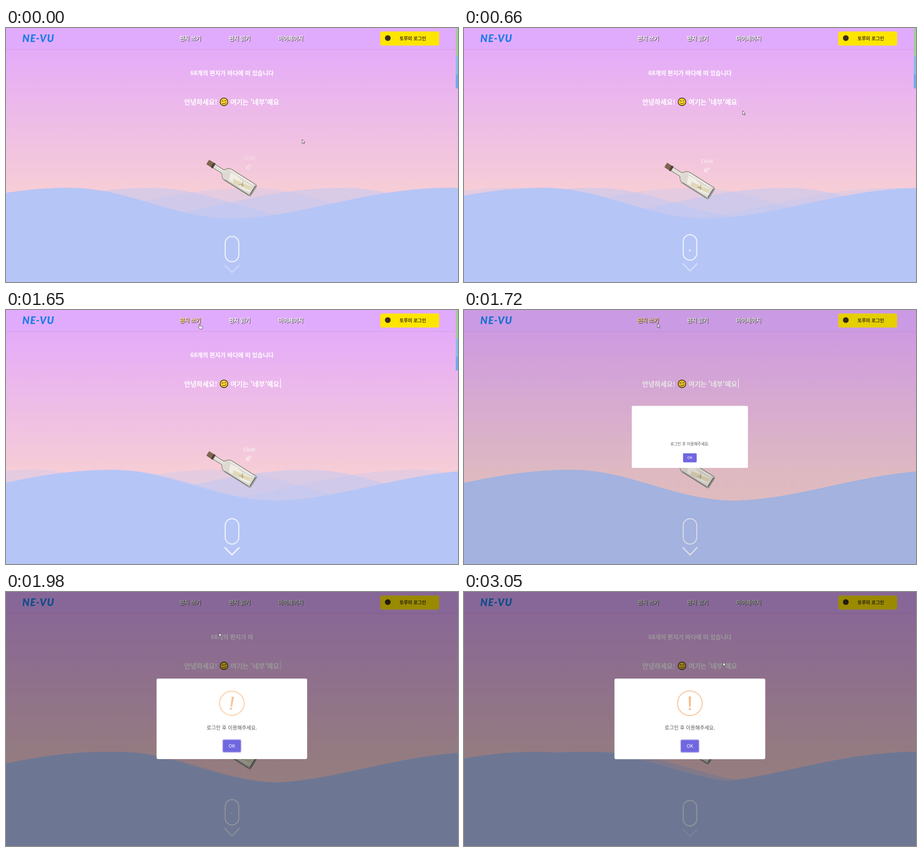
These frames come from a looping animation (998 px wide and 561 px high, 3120 ms). An HTML page:

```html
<!DOCTYPE html>
<html lang="ko">
<head>
<meta charset="utf-8">
<title>바다 편지</title>
<style>
  html, body { margin: 0; width: 100%; height: 100%; overflow: hidden; background: #e2a6fe; }
  svg { display: block; width: 998px; height: 561px; }
  text { font-family: "Noto Sans CJK KR", "Noto Sans CJK", "Noto Sans", sans-serif; font-weight: 500; fill: #fff; }
  .mid { text-anchor: middle; }
  .bold, .nav text { font-weight: 700; }
  .nav text { font-size: 12px; text-shadow: 1px 1px 1px #333; }
  .logo { font: italic 900 22px Lato, sans-serif; letter-spacing: 1.5px; fill: #1f7ee8; }
  .line { fill: none; stroke: #fff; stroke-linecap: round; stroke-linejoin: round; }
  .wave { fill: #b5c5f6; }
</style>
</head>
<body>
<svg viewBox="0 0 998 561">
  <defs>
    <linearGradient id="sky" x1="0" y1="0" x2="0" y2="1">
      <stop offset="0" stop-color="#e2a6fe"/>
      <stop offset=".64" stop-color="#f6cdd6"/>
      <stop offset="1" stop-color="#f9d4d0"/>
    </linearGradient>
    <linearGradient id="edge" x1="0" y1="0" x2="0" y2="1">
      <stop offset="0" stop-color="#000" stop-opacity=".04"/>
      <stop offset="1" stop-color="#000" stop-opacity="0"/>
    </linearGradient>
  </defs>

  <rect width="998" height="561" fill="url(#sky)"/>
  <g id="waves">
    <path class="wave"/><path class="wave"/><path class="wave"/><path class="wave"/><path class="wave"/>
  </g>

  <rect width="998" height="46" fill="#e1abfd"/>
  <rect y="46" width="998" height="5" fill="url(#edge)"/>
  <text class="logo" x="36" y="31">NE-VU</text>
  <g class="nav mid">
    <text id="write" x="406.500" y="27.500">편지 쓰기</text>
    <text x="515.500" y="27.500">편지 읽기</text>
    <text x="628.500" y="27.500">마이페이지</text>
  </g>
  <rect x="826.300" y="7.700" width="130" height="31" rx="4" fill="#fee500"/>
  <circle cx="843" cy="22.300" r="6.300" fill="#3a2d17"/>
  <text class="bold" x="869" y="27" font-size="10.100" style="fill:#4a3c17">토루미 로그인</text>
  <g id="strip">
    <rect x="993" width="5" height="63" fill="#a6c99f"/>
    <rect x="993" y="63" width="5" height="40" fill="#8bbde8"/>
    <rect x="993" y="103" width="5" height="30.500" fill="#6eaeea"/>
  </g>

  <text id="count" class="mid bold" x="499" y="103.500" font-size="12.900"></text>
  <rect id="countCaret" x="589" y="90" width="1.200" height="17" fill="#fff"/>
  <text class="bold" x="393.500" y="168.500" font-size="14.700">안녕하세요!</text>
  <text class="bold" x="495.500" y="168.500" font-size="14.600">여기는 '네부'예요</text>
  <rect id="caret" x="605.300" y="152" width="1.500" height="21" fill="#fff"/>
  <g transform="translate(481.300 163)" fill="none" stroke="#2b2412" stroke-linecap="round">
    <circle r="8.500" fill="#f9cd2c" stroke-width="1.400"/>
    <path d="M-5-1.500q1.800-2 3.600 0M1.400-2.200q1.800-2 3.600 0M-3.500 3.800Q2 6 5 1.500"/>
  </g>

  <g id="bottle">
    <g transform="translate(447 297) rotate(32.200)">
      <path d="M14-4.500H38Q43-14 51-14.500H114Q118-14.500 118-11V11Q118 14.500 114 14.500H51Q43 14 38 4.500H14Z"
            fill="#dcdcd3" fill-opacity=".85" stroke="#777a6c" stroke-width="1.200"/>
      <path d="M16-2H42M18 2.200H40" stroke="#f4f4ee" stroke-width="1.300" opacity=".8"/>
      <path d="M49-11.500H110" stroke="#f5f5f0" stroke-width="1.800"/>
      <path d="M50 13H114" stroke="#85897b" stroke-width="1.500"/>
      <path d="M53-7L70-9 82-5 108-7 112 7 91 10 78 7 60 10Z" fill="#f0eee5"/>
      <path d="M66 1L108-5 110 3 69 9Z" fill="#e2d8b6"/>
      <path d="M87-5L91 6M83 6q5-7 10-3" fill="none" stroke="#8b8165" stroke-width=".9"/>
      <path d="M115.500-12V12" stroke="#65685d" stroke-width="2.200"/>
      <rect x="-2" y="-6" width="13" height="12" rx="2" fill="#806550"/>
      <rect x="10" y="-6.500" width="5" height="13" rx="2" fill="#4d4137"/>
    </g>
    <g id="hint">
      <text class="mid" x="537.500" y="291" font-size="10.600">Click!</text>
      <path class="line" d="M538 301L532 308M542 303L535 310M531 304.500V311.500H538" stroke-width="1.200"/>
    </g>
  </g>

  <g id="mouse">
    <rect class="line" x="484" y="461" width="30" height="56" rx="15" stroke-width="2.500" opacity=".76"/>
    <circle id="dot" cx="498.700" r="2" fill="#fff"/>
    <path id="chevron" class="line" d="M483.500 525L499 541 514.500 525" stroke-width="2.800" stroke-linecap="butt"/>
  </g>

  <rect id="shade" width="998" height="561"/>
  <g id="modal">
    <rect x="-166.500" y="-89" width="333" height="178" rx="3.500" fill="#fff"/>
    <g id="icon">
      <circle r="27.300" fill="none" stroke="#facea8" stroke-width="2.500"/>
      <g id="mark" fill="#f8bb86">
        <path d="M-2.600-15H2.600L1.700 8H-1.700Z"/>
        <circle cy="12.700" r="2.500"/>
      </g>
    </g>
    <text class="mid" y="24" font-size="11.100" style="fill:#545454">로그인 후 이용해주세요.</text>
    <rect id="ring" x="-21" y="45" width="42" height="30" rx="4" fill="#b7b2ef"/>
    <rect x="-19.500" y="47" width="39" height="26" rx="2.500" fill="#7066e0"/>
    <text class="mid" y="63.800" font-size="10.500">OK</text>
  </g>

  <g id="pointer" fill="#fff" stroke="#333" stroke-width=".8" stroke-linejoin="round">
    <path id="arrow" d="M0 0V9L2 7.200 3.500 10.300 4.900 9.600 3.500 6.700H6Z"/>
    <path id="hand" d="M-.5 1q1-1.600 2 0V5l4.500 1q1.600.500 1.300 2L6.300 12H1L-2.500 7.500q0-1.600 2-.2Z"/>
  </g>
</svg>
<script>
const LOOP = 3120, TICK = 66, TICK_MS = 66.2, LAST = 46, OPEN = 1700;
const COUNT_TEXT = "68개의 편지가 바다에 떠 있습니다";
const $ = id => document.getElementById(id);
const waves = [...$("waves").children];
const set = (el, attr, value) => el.setAttribute(attr, value);
const fade = (id, value) => set($(id), "opacity", value);
const clamp = v => Math.max(0, Math.min(1, v));

// Linear track through [time, value] pairs.
function track(t, keys) {
  let i = 1;
  while (i < keys.length - 1 && t > keys[i][0]) i++;
  const [t0, a] = keys[i - 1], [t1, b] = keys[i];
  return a + (b - a) * clamp((t - t0) / (t1 - t0));
}

// The CSS "ease" curve, cubic-bezier(.25, .1, .25, 1).
function ease(x) {
  if (x <= 0) return 0;
  if (x >= 1) return 1;
  let lo = 0, hi = 1, u;
  for (let i = 0; i < 20; i++) {
    u = (lo + hi) / 2;
    const v = 1 - u;
    if (.75 * v * u + u * u * u < x) lo = u; else hi = u;
  }
  const v = 1 - u;
  return .3 * v * v * u + 3 * v * u * u + u * u * u;
}

// Waves fall faster than they rise.
const FALL = 362, RISE = 480, PERIOD = FALL + RISE;
function waveY(x, crest) {
  const d = ((x - crest) % PERIOD + PERIOD) % PERIOD;
  const phase = d < FALL ? d / FALL : 1 + ((d - FALL) / RISE) ** .9;
  return 387 - 34 * Math.cos(Math.PI * phase);
}
function drawWave(el, crest, opacity) {
  let d = "M0 561";
  for (let x = 0; x <= 1000; x += 5) d += `L${x} ${waveY(x, crest).toFixed(2)}`;
  set(el, "d", d + "V561Z");
  set(el, "opacity", opacity);
}

// Four sheer waves drift left behind a solid one drifting right;
// opening the dialog restarts them all from one place.
function drawWaves(t) {
  const s = t / 1000, d = (t - OPEN) / 1000, left = 47 * s;
  const list = d < 0
    ? [[540 - left, .28], [139 - left, .28], [320 - left, .45], [745 - left, .45], [139 + 56 * s, 1]]
    : [[235 - 30 * d, .3], [235, .3], [235 + 56 * d, .5], [235 - 56 * d, 1], [235 + 27 * d, 1]];
  list.forEach(([crest, opacity], i) => drawWave(waves[i], crest, opacity));
}

const pulse = (t, from, to) => t > from && t < to ? Math.sin(Math.PI * (t - from) / (to - from)) ** 2 : 0;

function drawText(t) {
  const shown = t < OPEN ? 1 : clamp((t - 1810) / 350);
  $("count").textContent = COUNT_TEXT.slice(0, Math.round(shown * COUNT_TEXT.length));
  fade("countCaret", pulse(t, 70, 750));
  const steady = track(t, [[760, 0], [1150, 1], [1850, 1], [2300, 0]]);
  fade("caret", Math.max(steady, pulse(t, 70, 750), pulse(t, 2430, 3030)));
  $("write").style.fill = t > 1250 && t < 1950 ? "#ffdf80" : "#fff";
}

function drawFloaters(t) {
  const y = track(t, [[0, 0], [660, 6.5], [1190, 12], [1720, 22], [1790, 22], [2380, 15], [3050, 9]]);
  set($("bottle"), "transform", `translate(0 ${y})`);
  fade("hint", track(t, [[0, .5], [660, .85], [1190, 1]]));

  const p = ((t + 1270) % 1500) / 1500;
  set($("mouse"), "transform", `translate(0 ${-5 * Math.sin(Math.PI * p ** .8) ** 2})`);
  set($("dot"), "cy", 484 + 40 * p);
  fade("dot", track(p, [[0, 0], [.25, .8], [.65, .8], [.82, 0]]));
  fade("chevron", track(t, [[0, .3], [660, .4], [1190, .88], [1790, .85], [2380, .28], [3050, .3]]));
}

function drawModal(t) {
  const d = t - OPEN, open = d >= 0;
  fade("strip", open ? 0 : 1);
  fade("shade", .4 * clamp(d / 88));
  fade("modal", open ? 1 : 0);
  if (!open) return;
  const scale = d < 135 ? .7 + .35 * ease(d / 135)
    : d < 240 ? 1.05 - .1 * ease((d - 135) / 105)
    : .95 + .05 * ease((d - 240) / 60);
  set($("modal"), "transform", `translate(498.7 280.2) scale(${scale})`);
  fade("ring", d > 60 ? 1 : 0);
  const turn = ease(d / 500);
  const tilt = Math.abs(Math.cos((1 - turn) * 100 * Math.PI / 180));
  set($("icon"), "transform", `translate(0 -34.5) scale(1 ${tilt})`);
  fade("icon", turn);
  const spin = track(d, [[0, 45], [125, -25], [250, 15], [375, -5], [500, 0]]);
  set($("mark"), "transform", `rotate(${spin})`);
}

const PATH = [
  [0, 654, 246], [330, 655, 236], [460, 650, 211], [590, 640, 199], [660, 616, 183],
  [860, 540, 130], [1060, 475, 78], [1190, 434, 38], [1450, 427, 30], [1850, 427, 30],
  [2250, 555, 206], [2850, 555, 206], [2980, 563, 197], [3045, 572, 155]
];
function drawPointer(t) {
  const x = track(t, PATH.map(k => [k[0], k[1]]));
  const y = track(t, PATH.map(k => [k[0], k[2]]));
  set($("pointer"), "transform", `translate(${x} ${y})`);
  const onLink = t > 1150 && t < OPEN;
  fade("hand", onLink ? 1 : 0);
  fade("arrow", onLink ? 0 : 1);
}

const start = performance.now();
let shown = -1;
function frame() {
  const tick = Math.min(LAST, Math.floor(((performance.now() - start) % LOOP) / TICK));
  if (tick !== shown) {
    shown = tick;
    const t = tick * TICK_MS;
    [drawWaves, drawText, drawFloaters, drawModal, drawPointer].forEach(draw => draw(t));
  }
  requestAnimationFrame(frame);
}
frame();
</script>
</body>
</html>
```
